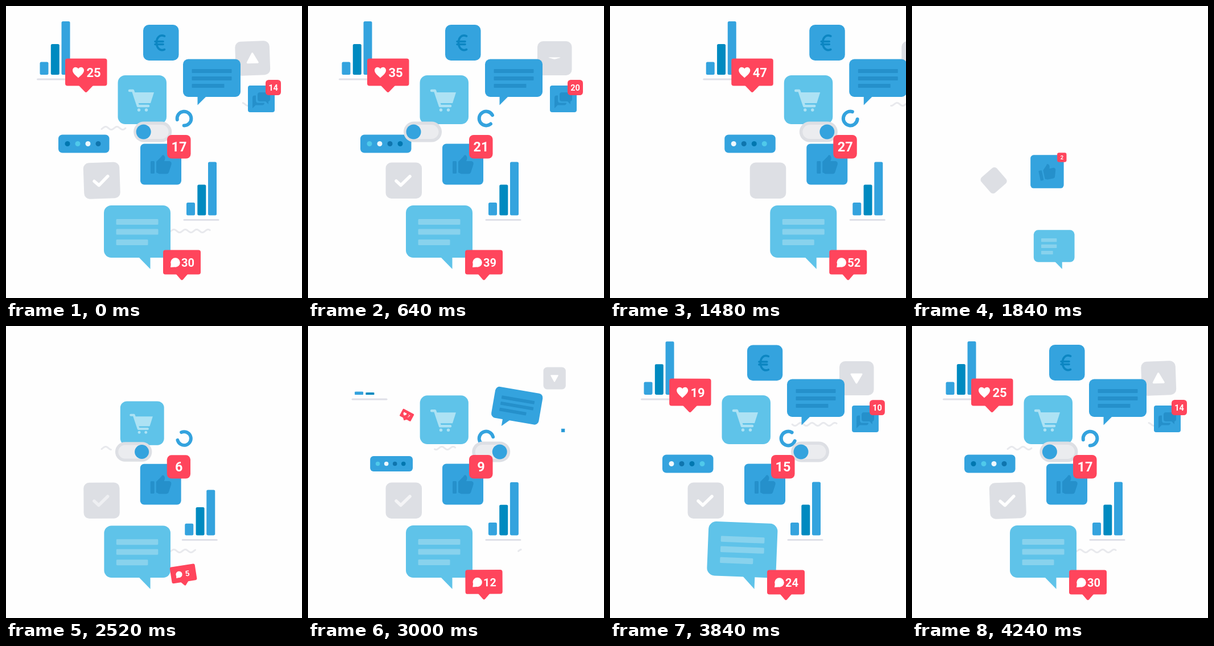
These frames come from a looping animation (520x514 px, 4280 ms). An HTML page:

```html
<!DOCTYPE html>
<html lang="en">
<head>
<meta charset="utf-8">
<title>Social reactions</title>
<style>
  html, body { margin: 0; width: 100%; height: 100%; overflow: hidden; background: #fefefe; }
  svg { display: block; width: 520px; height: 514px; }
  text { font: 700 22px Roboto, "Open Sans", sans-serif; fill: #fff; text-anchor: middle; }
  .mid { fill: #34a3de; }
  .light { fill: #5fc3e9; }
  .deep { fill: #008ac0; }
  .gray { fill: #dddfe4; }
  .red { fill: #ff455c; }
  .shade { fill: #2590cb; }
  .white { fill: #fff; }
  .line { fill: none; stroke-linecap: round; stroke-linejoin: round; }
</style>
</head>
<body>
<svg viewBox="0 0 520 514"><g id="scene"></g></svg>
<script>
const LOOP = 4280, CYCLE = 4240, EXIT_END = 1690;
const scene = document.getElementById('scene');

const box = (x, y, w, h, r, cls, extra = '') =>
  `<rect x="${x}" y="${y}" width="${w}" height="${h}" rx="${r}" class="${cls}" ${extra}/>`;
const shape = (d, cls, extra = '') => `<path d="${d}" class="${cls}" ${extra}/>`;
const dot = (x, y, r, cls, extra = '') => `<circle cx="${x}" cy="${y}" r="${r}" class="${cls}" ${extra}/>`;
const group = (id, ...parts) => `<g id="${id}">${parts.join('')}</g>`;
const label = (id, x, y, size) => `<text id="${id}" x="${x}" y="${y}" style="font-size:${size}px"></text>`;

const wave = id => shape('', 'line', `id="${id}" stroke="#e8e9ed" stroke-width="3"`);
const bars = id => group(id,
  box(54, 127.5, 63, 3, 1.5, '', 'fill="#dfe0e8"'),
  ...[[59.5, 98.5], [78.8, 67], [97.5, 27]].map(([x, y], i) =>
    box(x, y, 15, 121 - y, 2.5, i === 1 ? 'deep' : 'mid', `id="${id}Bar${i}"`)));

scene.innerHTML = [
  wave('waveTop'), wave('waveLow'), wave('waveLeft'),
  bars('barsA'),
  group('heart',
    box(104, 92.5, 73.5, 48, 4, 'red'),
    shape('M127 139 L138.5 151 Q140.5 153 142.5 151 L154 139Z', 'red'),
    shape('M127 126.5 C123 122.5 117 118.5 117 113.5 C117 107 124.5 106 127 110.5 C129.5 106 137 107 137 113.5 C137 118.5 131 122.5 127 126.5Z', 'white'),
    label('heartCount', 154, 125, 22)),
  group('euro',
    box(241, 33, 62.5, 63, 10, 'mid'),
    shape('M278.5 53 C269 49 264.5 57 264.5 64.5 C264.5 72 269 80.5 278.5 76.5 M262 62.5 H276 M262 67.5 H276', 'line', 'stroke="#0c86c2" stroke-width="3.6"')),
  group('arrow',
    box(403, 62, 60.5, 60, 10, 'gray'),
    group('triangle', shape('M433 83.5 L442 99.5 H424Z', 'white', 'stroke="#fff" stroke-width="3" stroke-linejoin="round"'))),
  group('bubble',
    shape('M336.5 158 V174.5 L353 158Z', 'mid'),
    box(311, 93.5, 101, 66.5, 9, 'mid'),
    ...[[111, 70], [124, 70], [137, 57]].map(([y, w]) => box(326.5, y, w, 7, 1, 'shade'))),
  group('chat',
    box(425, 140, 47, 47, 4, 'mid'),
    box(442, 152, 22, 16, 4, 'shade'), shape('M454 166 L461 173 V165Z', 'shade'),
    shape('M439 157.5 H437 Q433 157.5 433 161.5 V180 L438.5 174.5 H450 Q454 174.5 454 170.5 H443 Q439 170.5 439 166Z', 'shade'),
    group('chatBadge', box(456, 130, 27, 27, 5.5, 'red'), label('chatCount', 469.5, 149, 14.5))),
  group('cart',
    box(196.5, 122, 85.5, 86, 13, 'light'),
    shape('M217 149 H223 L232 176 H250', 'line', 'stroke="#ade2f4" stroke-width="4.5"'),
    shape('M224 152 H260 L254 171 H230Z', '', 'fill="#ade2f4"'),
    dot(233.5, 183, 2.7, '', 'fill="#ade2f4"'), dot(246.5, 183, 2.7, '', 'fill="#ade2f4"')),
  group('ring', shape('M9.5 -8 A12.4 12.4 0 1 1 -6 -10.9', 'line', 'stroke="#34a3de" stroke-width="6"')),
  group('dots', box(92, 226.5, 89.5, 32, 7, 'mid'),
    ...[0, 1, 2, 3].map(i => dot(108 + 18 * i, 242.5, 4.5, '', `id="dot${i}"`))),
  group('toggle',
    box(0, 203.5, 67, 36, 18, 'gray'), box(5.5, 209, 56, 25, 12.5, '', 'fill="#ebecef"'),
    dot(0, 221.5, 13, 'mid', 'id="knob"')),
  group('thumb',
    box(236, 242.5, 72, 72, 7, 'mid'),
    group('thumbIcon', box(254, 273, 7, 22, 1.5, 'shade'),
      shape('M264 274 L273 265 Q275 260.5 278 263.5 Q281 267 278 273 H287 Q291.5 274 290.5 279 L286 293 Q285 295.5 282 295.5 H269 L264 293Z', 'shade')),
    group('thumbBadge', box(283, 227, 41.5, 41.5, 8, 'red'), label('thumbCount', 304, 256, 23.5))),
  group('check',
    box(136.5, 275.5, 63.5, 63.5, 10, 'gray'),
    shape('M155 308 L163 315.5 L179 300', 'line', 'id="tick" stroke="#fff" stroke-width="5.5"')),
  bars('barsB'),
  group('message',
    shape('M232 441 L253.5 463 V440Z', 'light'),
    box(172, 351, 117, 92, 13, 'light'),
    group('messageLines', ...[[375, 74], [392.5, 74], [411, 56]].map(([y, w]) =>
      box(193.5, y, w, 10, 1.5, '', 'fill="#88d2ed"')))),
  group('comment',
    box(276, 429.5, 66, 43, 4, 'red'),
    shape('M298 471 L307 481.5 Q309 483.5 311 481.5 L320 471Z', 'red'),
    dot(297.5, 451.5, 8.3, 'white'), shape('M289.8 454 L289 460 L296 459.6Z', 'white'),
    label('commentCount', 319.5, 459, 20))
].join('');

const el = { scene };
scene.querySelectorAll('[id]').forEach(node => el[node.id] = node);
const set = (id, attrs) => { for (const k in attrs) el[id].setAttribute(k, attrs[k]); };

// Eased 0 to 1 entrance that begins at the given time.
const enter = (t, start) => t <= start ? 0 : t >= start + 1000 ? 1 : 1 - 2 ** (-(t - start) / 100);

// Smooth interpolation through [time, value] stops.
function track(t, stops) {
  if (t <= stops[0][0]) return stops[0][1];
  for (let i = 1; i < stops.length; i++) {
    const [t0, a] = stops[i - 1], [t1, b] = stops[i];
    if (t < t1) return a + (b - a) * (1 - Math.cos(Math.PI * (t - t0) / (t1 - t0))) / 2;
  }
  return stops[stops.length - 1][1];
}

const pivoted = (x, y, dx, dy, rot, sx, sy = sx) =>
  `translate(${x + dx} ${y + dy}) rotate(${rot}) scale(${sx} ${sy}) translate(${-x} ${-y})`;

// Part, start, pivot x and y, then starting offset and rotation.
const entrances = [
  ['heart', 2950, 140.5, 152, 40, 20, 40],
  ['euro', 3050, 272, 64.5, -30, 100, 0],
  ['bubble', 2740, 337, 174, 20, 10, 60],
  ['chat', 2980, 448, 187, 0, 0, 0],
  ['chatBadge', 3060, 469.5, 143.5, 0, 0, 0],
  ['cart', 2190, 239, 165, 0, 60, 0],
  ['thumb', 1600, 272, 278, -184, 70, 0],
  ['thumbBadge', 1745, 304, 247.5, 0, 0, 0],
  ['dots', 2740, 137, 242.5, 60, 0, 0],
  ['comment', 2360, 309, 483, 18, -79, -27]
];

function drawBars(id, t, x, y, dx, starts) {
  const grow = enter(t, starts[0]);
  set(id, { transform: `translate(${x + dx * (1 - grow)} ${y})`, opacity: t > starts[0] ? 1 : 0 });
  starts.forEach((start, i) => set(`${id}Bar${i}`, { transform: pivoted(0, 121, 0, 0, 0, 1, enter(t, start)) }));
}

function drawWave(id, t, y, tailAtWrap, base, lo, hi, from, to) {
  const span = 387;
  const travel = tailAtWrap + .24 * (t - CYCLE) - base;
  const tail = base + ((travel % span) + span) % span;
  const a = Math.max(lo, tail), b = Math.min(hi, tail + 78);
  let d = '';
  if (t > from && t < to)
    for (let x = a; x <= b; x += 1.5) d += `${d ? 'L' : 'M'}${x.toFixed(1)} ${(y + 2.6 * Math.sin(x * Math.PI / 10)).toFixed(2)}`;
  set(id, { d });
}

const count = (id, t, start, perSecond) =>
  el[id].textContent = Math.max(0, Math.floor((t - start) * perSecond / 1000));

function draw(elapsed) {
  let u = elapsed % LOOP;
  if (u >= CYCLE) u = 0;
  const t = u < EXIT_END ? u + CYCLE : u;

  const slide = t > 5280 ? 108 * Math.exp(.01153 * (t - 5720)) : 0;
  set('scene', { transform: `translate(${slide} 0)` });

  for (const [id, start, x, y, dx, dy, rot] of entrances) {
    const e = enter(t, start), rest = 1 - e;
    set(id, { transform: pivoted(x, y, dx * rest, dy * rest, rot * rest, e) });
  }
  set('thumbIcon', { transform: pivoted(272, 278, 0, 0, -55 * (1 - enter(t, 1620)), 1) });

  const tilt = track(t, [[4040, 0], [4200, -2], [4320, -2], [4480, 0]]);
  const checkIn = enter(t, 1720), checkRest = 1 - checkIn;
  set('check', { transform: pivoted(168, 307, -57 * checkRest, 0, -95 * checkRest + tilt, checkIn) });
  set('tick', { 'stroke-opacity': track(t, [[2380, 0], [2560, .55], [3480, .8], [4000, 1], [5440, 1], [5580, 0]]) });

  const nod = tilt + track(t, [[5200, 0], [5360, -2], [5440, -2], [5600, 0]]);
  set('arrow', { transform: pivoted(433, 92, 0, 0, nod, enter(t, 2850)) });
  const flip = track(t, [[3820, -1], [4040, 1], [4760, 1], [4980, -1]]);
  set('triangle', { transform: pivoted(433, 92, 0, 0, 0, 1, flip) });

  const e = enter(t, 1704);
  const swing = track(t, [[3300, 0], [3480, -9], [3700, 8], [3920, 0], [5000, 0], [5180, -9], [5400, 8], [5620, 0]]);
  const swell = track(t, [[3300, 1], [3480, .86], [3700, 1.13], [3920, 1], [5000, 1], [5180, .86], [5400, 1.13], [5620, 1]]);
  set('message', { transform: `${pivoted(280, 463, 0, 0, 0, e)} ${pivoted(253.5, 463, 0, 0, swing, swell)}` });
  set('messageLines', { transform: pivoted(193.5, 0, 0, 0, 0, enter(t, 1708), 1) });

  drawBars('barsA', t, 0, 0, 30, [2960, 2990, 3030]);
  drawBars('barsB', t, 257.5, 247.5, -36, [2150, 2165, 2246]);

  set('ring', { transform: `translate(313 198) rotate(${210 + .375 * (t - CYCLE)}) scale(${enter(t, 2050)})` });

  const head = Math.floor(3.3 + (t - 3480) / 240);
  for (let i = 0; i < 4; i++) {
    const lag = (((head - i) % 4) + 4) % 4;
    set('dot' + i, { fill: ['#eef8fd', '#4fc9ea', '#0077b0', '#0f75ae'][lag] });
  }

  const left = track(t, [[2230, 168], [3480, 345], [3560, 345], [4660, 168], [5370, 168], [6300, 346]]);
  const knob = track(t, [[2230, 17.5], [2350, 48.5], [3520, 48.5], [3640, 17.5], [5410, 17.5], [5530, 48.5]]);
  set('toggle', { transform: `translate(${left} 0) ${pivoted(33.5, 221.5, 0, 0, 0, enter(t, 2050))}` });
  set('knob', { cx: knob });

  drawWave('waveTop', t, 173, 416, 160, 240, 465, 3200, 1e5);
  drawWave('waveLow', t, 396, 280, 150, 230, 375, 2300, 5550);
  drawWave('waveLeft', t, 215, 133, 80, 168, 260, 2400, 5550);

  count('heartCount', t, 2527, 15);
  count('thumbCount', t, 1517, 6.5);
  count('chatCount', t, 2830, 10);
  count('commentCount', t, 2166, 14.7);
}

const began = performance.now();
function frame() {
  draw(performance.now() - began);
  requestAnimationFrame(frame);
}
frame();
</script>
</body>
</html>
```
